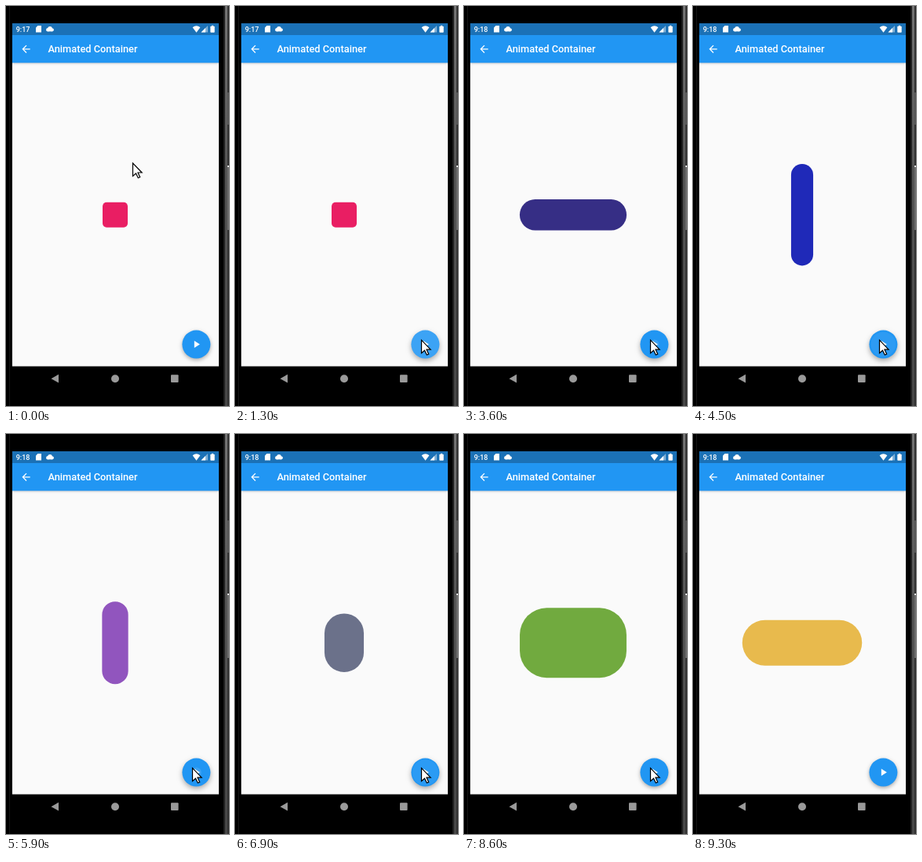
An HTML page with a canvas for the animation above (9600 ms loop, 284 by 509 pixels).

```html
<!DOCTYPE html>
<html lang="en">
<head>
<meta charset="utf-8">
<title>Animated Container</title>
<style>
  html, body { margin: 0; width: 100%; height: 100%; overflow: hidden; background: #000; }
  canvas { display: block; width: 284px; height: 509px; }
</style>
</head>
<body>
<canvas id="stage" width="284" height="509"></canvas>
<script>
const ctx = document.getElementById('stage').getContext('2d');
const LOOP = 9600, STEP = 100, MORPH = 1000;
const BLUE = '#2196f3';
const FAB = { x: 242.4, y: 430.6, r: 18 };
const CENTER = { x: 139, y: 265.7 };

// Box state: width, height, corner radius, red, green, blue
const START = [32, 32, 5.1, 233, 30, 99];
const TAPS = [
  { at: 1310, press: 1000, to: [72, 145, 50, 142, 114, 60] },
  { at: 2750, press: 2680, to: [137, 38, 40, 53, 45, 134] },
  { at: 3660, press: 3600, to: [13, 142.5, 45, 23, 35, 189] },
  { at: 4340, press: 4260, to: [103, 62, 40, 95, 105, 170] },
  { at: 5230, press: 5150, to: [27.5, 108.5, 45, 149, 83, 192] },
  { at: 5960, press: 5890, to: [53, 70, 30, 110, 112, 140] },
  { at: 6720, press: 6640, to: [32, 103, 20, 70, 130, 100] },
  { at: 7580, press: 7500, to: [131.5, 107, 31.5, 42, 162, 52] },
  { at: 8300, press: 8220, to: [152.5, 58, 40, 232, 186, 77] }
];

// Cursor tip: time, x, y
const POINTER = [
  [0, 161.5, 200], [400, 214, 345], [600, 236, 438], [700, 237.5, 425.2],
  [8600, 237.5, 425.2], [8900, 230, 300], [9200, 205, 30], [9300, 200, -30]
];

const ARROW = new Path2D('M20 11H7.83l5.59-5.59L12 4l-8 8 8 8 1.41-1.41L7.83 13H20v-2z');
const PLAY = new Path2D('M8 5v14l11-7z');
const CURSOR = new Path2D('M0 0V16.5L4 13L6.8 18.8L9.2 17.7L6.5 12H11.6Z');

const clamp = v => Math.max(0, Math.min(1, v));
const mix = (a, b, k) => a + (b - a) * k;

// cubic-bezier(.4, 0, .2, 1)
function ease(x) {
  if (x <= 0 || x >= 1) return clamp(x);
  let lo = 0, hi = 1;
  for (let i = 0; i < 24; i++) {
    const s = (lo + hi) / 2, u = 1 - s;
    if (1.2 * u * u * s + 0.6 * u * s * s + s * s * s < x) lo = s; else hi = s;
  }
  return lo * lo * (3 - 2 * lo);
}

function boxAt(t) {
  let state = START;
  TAPS.forEach((tap, i) => {
    if (t < tap.at) return;
    const next = TAPS[i + 1];
    const end = next ? Math.min(t, next.at) : t;
    const k = ease((end - tap.at) / MORPH);
    state = state.map((v, j) => mix(v, tap.to[j], k));
  });
  return state;
}

function pointerAt(t) {
  const i = POINTER.findIndex(p => p[0] > t);
  if (i < 0) return POINTER[POINTER.length - 1].slice(1);
  const a = POINTER[i - 1], b = POINTER[i], k = (t - a[0]) / (b[0] - a[0]);
  return [mix(a[1], b[1], k), mix(a[2], b[2], k)];
}

function rect(x, y, w, h, color) {
  ctx.fillStyle = color;
  ctx.fillRect(x, y, w, h);
}

function round(x, y, w, h, r, color) {
  ctx.fillStyle = color;
  ctx.beginPath();
  ctx.roundRect(x, y, w, h, r);
  ctx.fill();
}

function disc(x, y, r, color) {
  ctx.fillStyle = color;
  ctx.beginPath();
  ctx.arc(x, y, r, 0, Math.PI * 2);
  ctx.fill();
}

function poly(points, color) {
  ctx.fillStyle = color;
  ctx.beginPath();
  points.forEach(p => ctx.lineTo(...p));
  ctx.closePath();
  ctx.fill();
}

function icon(path, x, y, scale, color) {
  ctx.save();
  ctx.translate(x, y);
  ctx.scale(scale, scale);
  ctx.fillStyle = color;
  ctx.fill(path);
  ctx.restore();
}

function text(value, x, y, font) {
  ctx.fillStyle = '#fff';
  ctx.font = font + ' Roboto, sans-serif';
  ctx.fillText(value, x, y);
}

function shadow(color, blur, dy) {
  ctx.shadowColor = color;
  ctx.shadowBlur = blur;
  ctx.shadowOffsetY = dy;
}

function drawPhone() {
  rect(0, 0, 284, 509, '#000');
  rect(4, 0, 1, 509, '#161616');
  rect(277, 0, 2, 509, '#222');
  const edge = ctx.createLinearGradient(0, 0, 0, 509);
  edge.addColorStop(0, '#747474');
  edge.addColorStop(0.4, '#565656');
  edge.addColorStop(1, '#484848');
  rect(279, 0, 3, 509, edge);
  rect(282, 0, 2, 509, '#303030');
  rect(282, 110, 2, 41, '#555');
  rect(282, 205, 2, 80, '#6c6c6c');
  rect(282, 203, 2, 2, '#ddd');
}

function drawStatus(t) {
  rect(8, 22, 263, 15, '#1b71b6');
  text(t < 3000 ? '9:17' : '9:18', 12.7, 32.8, '500 9px');
  poly([[40.5, 25], [45, 25], [45, 33.5], [38, 33.5], [38, 27.5]], '#fff');
  disc(53.3, 30.2, 2.2, '#fff');
  disc(56, 28.9, 2.9, '#fff');
  disc(58.8, 30.3, 2.1, '#fff');
  rect(53.3, 30, 5.5, 2.4, '#fff');

  ctx.fillStyle = '#fff';
  ctx.beginPath();
  ctx.moveTo(242.5, 33.7);
  ctx.lineTo(237.6, 27.2);
  ctx.quadraticCurveTo(242.5, 23.2, 247.4, 27.2);
  ctx.fill();
  poly([[257, 25], [257, 33.5], [248.5, 33.5]], 'rgba(255,255,255,.45)');
  poly([[254, 28], [254, 33.5], [248.5, 33.5]], '#fff');
  round(260.3, 25.8, 5.4, 8, 0.8, '#fff');
  rect(261.9, 24.8, 2.2, 1.2, '#fff');
}

function drawApp(t) {
  rect(8, 22, 263, 436.5, '#fafafa');
  ctx.save();
  ctx.beginPath();
  ctx.rect(8, 22, 263, 436.5);
  ctx.clip();
  shadow('rgba(0,0,0,.3)', 3, 1);
  rect(8, 37, 263, 35.3, BLUE);
  ctx.restore();
  drawStatus(t);
  icon(ARROW, 17.9, 47.1, 0.64, '#fff');
  text('Animated Container', 53.5, 59.1, '500 12.8px');
}

function drawBox(t) {
  const [w, h, r, ...rgb] = boxAt(t);
  round(CENTER.x - w / 2, CENTER.y - h / 2, w, h, r, `rgb(${rgb.map(Math.round)})`);
}

function drawFab(t) {
  const tap = TAPS.find(p => t >= p.press && t < p.at + 300);
  ctx.save();
  shadow('rgba(0,0,0,.32)', tap ? 6 : 5, tap ? 3 : 2);
  disc(FAB.x, FAB.y, FAB.r, BLUE);
  ctx.restore();
  if (tap) {
    const grow = clamp((t - tap.press) / 300);
    const fade = 1 - clamp((t - tap.at) / 300);
    disc(FAB.x, FAB.y, mix(6, FAB.r, grow), `rgba(255,255,255,${0.12 * fade})`);
  }
  icon(PLAY, FAB.x - 7.7, FAB.y - 7.7, 0.64, '#fff');
}

function drawNav() {
  const gray = '#9a9a9a';
  poly([[57.5, 474.2], [67, 468.8], [67, 479.6]], gray);
  disc(139, 474.2, 5, gray);
  round(210, 469.3, 9.6, 9.8, 1, gray);
}

function drawCursor(t) {
  const [x, y] = pointerAt(t);
  ctx.save();
  ctx.translate(x, y);
  ctx.fillStyle = '#fff';
  ctx.strokeStyle = '#000';
  ctx.lineWidth = 1.2;
  ctx.fill(CURSOR);
  ctx.stroke(CURSOR);
  ctx.restore();
}

function draw(t) {
  drawPhone();
  drawApp(t);
  drawBox(t);
  drawFab(t);
  drawNav();
  drawCursor(t);
}

const origin = performance.now();
function tick() {
  const t = (performance.now() - origin) % LOOP;
  draw(Math.min(9300, Math.floor(t / STEP) * STEP));
  requestAnimationFrame(tick);
}
tick();
</script>
</body>
</html>
```
